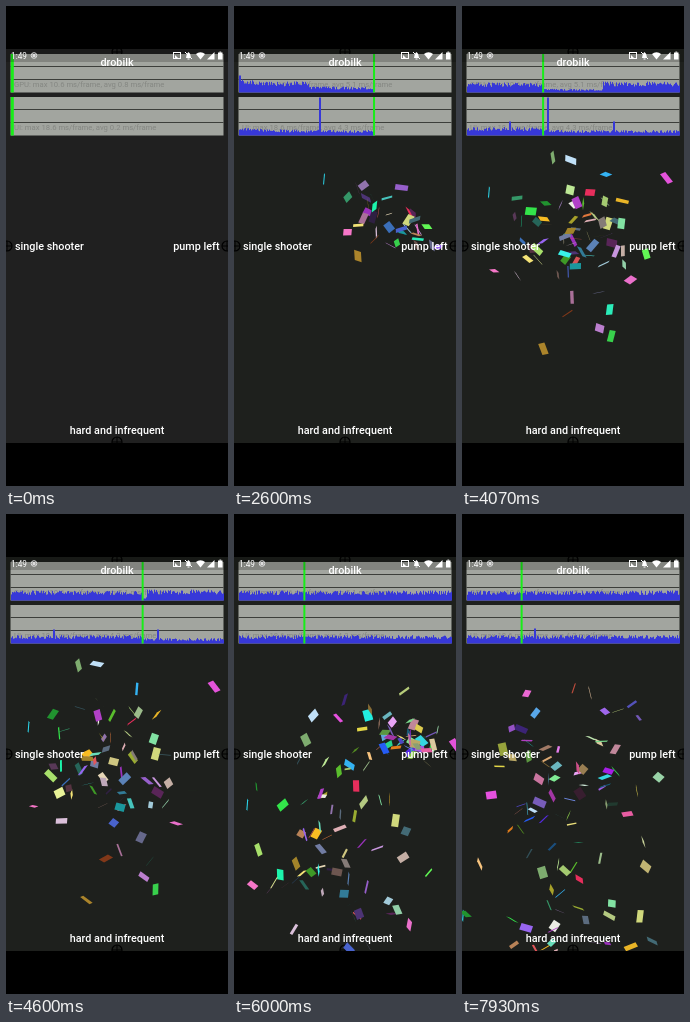
Animation of 222 by 480 pixels, one loop 8 s. Source, as an HTML page with a canvas:

```html
<!DOCTYPE html>
<html lang="en">
<head>
<meta charset="utf-8">
<title>Confetti</title>
<style>
html, body { margin: 0; width: 100%; height: 100%; overflow: hidden; background: #000; }
canvas { display: block; }
</style>
</head>
<body>
<canvas id="stage" width="222" height="480"></canvas>
<script>
const ctx = document.getElementById('stage').getContext('2d');
const LOOP = 8000, START = 1320, SPEED = 0.1048, LEFT = 5, SPAN = 213;
const TAU = Math.PI * 2;

const hash = n => {
  const v = Math.sin(n * 12.9898 + 4.1) * 43758.5453;
  return v - Math.floor(v);
};

// Each burst: launch time in ms, number of pieces
const bursts = [[2050, 13], [2240, 21], [2500, 7], [3200, 9], [3350, 25],
                [5560, 13], [5740, 36], [6350, 7], [6750, 6]];
const pieces = [];
for (const [born, count] of bursts) {
  for (let i = 0; i < count; i++) {
    const seed = pieces.length * 17 + 3;
    const r = k => hash(seed + k);
    pieces.push({
      born: born + 200 * r(0),
      reach: 5 + 100 * (r(1) + r(2)),
      lift: -20 + 88 * (r(3) + r(4)),
      fall: 48 + 46 * r(5),
      drift: 20 * (r(6) - 0.5),
      w: 9.5 + 3.5 * r(7),
      h: 6 + 2.5 * r(8),
      angle: TAU * r(9),
      tilt: TAU * r(10),
      flip: TAU * r(11),
      spin: 5 * (r(12) - 0.5),
      color: `rgb(${[13, 14, 15].map(k => Math.round(25 + 225 * r(k)))})`
    });
  }
}

function rect(x, y, w, h, color) {
  ctx.fillStyle = color;
  ctx.fillRect(x, y, w, h);
}

function label(text, x, y, size = 10.8, align = 'left', weight = 500, color = '#fff') {
  ctx.font = `${weight} ${size}px Roboto, sans-serif`;
  ctx.textAlign = align;
  ctx.fillStyle = color;
  ctx.fillText(text, x, y);
}

function shape(points, color = '#fff') {
  ctx.fillStyle = color;
  ctx.beginPath();
  points.forEach(([x, y]) => ctx.lineTo(x, y));
  ctx.fill();
}

function ring(x, y, r, color, width = 1) {
  ctx.strokeStyle = color;
  ctx.lineWidth = width;
  ctx.beginPath();
  ctx.arc(x, y, r, 0, TAU);
  ctx.stroke();
}

function emitter(x, y) {
  ring(x, y, 5, '#000', 1.2);
  rect(x - 5, y - 0.5, 10, 1, '#000');
  rect(x - 0.5, y - 5, 1, 10, '#000');
}

function gpuBar(x, sweep, t) {
  const noise = hash(x * 1.7 + sweep * 311);
  if (sweep > 0) return 5.5 + 4.5 * noise;
  if (x > 135) return 6 + 5 * noise;
  const height = x < 2 ? 17 : x < 70 ? 6 + 5 * noise + 4 * Math.exp(-x / 12) : 3 + 3 * noise;
  return height * (t > 3100 ? 0.6 : 1);
}

const spikes = { '0:80': 38, '0:146': 14, '1:42': 14, '2:67': 15 };
function uiBar(x, sweep) {
  const spike = spikes[sweep + ':' + x] || spikes[sweep + ':' + (x - 1)];
  if (spike) return spike;
  const noise = hash(x * 2.3 + sweep * 173 + 50);
  return sweep ? 4.5 + 4 * noise : 2.5 + 3 * noise + 3 * Math.exp(-x / 30);
}

function graph(top, height, caption, bar, t) {
  rect(4.5, top, 213, height, '#a2a59f');
  for (const part of [1, 2]) rect(4.5, Math.round(top + height * part / 3) - 1, 213, 1, '#3c3e3a');
  label(caption, 8, top + height - 6, 7.7, 'left', 400, 'rgba(30,32,30,0.22)');

  const run = Math.max(0, t - START) * SPEED;
  const sweep = Math.floor(run / SPAN), head = run % SPAN;
  for (let x = 0; x < SPAN; x++) {
    const n = x < head ? sweep : sweep - 1;
    if (n < 0) break;
    const h = bar(x, n, t);
    rect(LEFT + x, top + height - h, 1, h, '#3738d8');
  }
  const width = t > START ? 2 : 3;
  rect(LEFT + head - 0.2, top, width, height, '#18ee18');
}

function confetti(t) {
  for (const p of pieces) {
    const age = (t - p.born) / 1000;
    if (age < 0) continue;
    const x = 208 - p.reach * (1 - Math.exp(-2.5 * age)) + p.drift * age;
    const y = 242 - p.lift * (1 - Math.exp(-2 * age))
            + p.fall * (age - (1 - Math.exp(-1.2 * age)) / 1.2);
    if (y > 445) continue;
    const tilt = p.tilt + p.spin * age, flip = p.flip + p.spin * 1.4 * age;
    ctx.save();
    ctx.translate(x, y);
    ctx.rotate(p.angle + p.spin * 0.6 * age);
    ctx.transform(Math.cos(tilt), Math.sin(tilt) * Math.sin(flip), 0, Math.cos(flip), 0, 0);
    rect(-p.w / 2, -p.h / 2, p.w, p.h, p.color);
    ctx.restore();
  }
}

function statusBar() {
  rect(0, 43, 222, 13, 'rgba(0,0,0,0.2)');
  label('1:49', 5, 53, 8.3, 'left', 400);
  ring(28, 49.5, 2.8, '#ddd');
  rect(26.5, 48, 3, 3, '#ddd');
  // Cast
  ctx.strokeStyle = '#fff';
  ctx.lineWidth = 1;
  ctx.strokeRect(167.5, 46.5, 7, 6);
  shape([[169, 52], [169, 49], [172, 52]]);
  // Muted bell
  shape([[180, 52], [180.8, 48], [182.5, 46], [184.2, 48], [185, 52]]);
  rect(181.5, 52.5, 2, 1, '#fff');
  ctx.beginPath();
  ctx.moveTo(179, 46);
  ctx.lineTo(186, 53);
  ctx.stroke();
  // Wi-Fi, signal, battery
  shape([[190, 48], [192, 46.7], [194.5, 46.3], [197, 46.7], [199, 48], [194.5, 53.5]]);
  shape([[201, 53.5], [208.5, 46], [208.5, 53.5]]);
  rect(212, 46.5, 4.5, 7, '#fff');
  rect(213.4, 45.6, 1.8, 1, '#fff');
}

function draw(t) {
  const running = t > START;
  rect(0, 0, 222, 480, '#000');
  ctx.save();
  ctx.beginPath();
  ctx.rect(0, 43, 222, 394);
  ctx.clip();
  rect(0, 43, 222, 394, running ? '#1e201d' : '#202020');
  emitter(1, 240);
  emitter(221, 240);
  emitter(111, 46);
  emitter(111, 436);
  confetti(t);
  graph(48, 38.5, `GPU: max 10.6 ms/frame, avg ${running ? '5.1' : '0.8'} ms/frame`, gpuBar, t);
  graph(91, 38.5, `UI: max 18.6 ms/frame, avg ${running ? '4.3' : '0.2'} ms/frame`, uiBar, t);
  statusBar();
  label('drobilk', 111, 60, 10.8, 'center');
  label('single shooter', 9, 244);
  label('pump left', 213.5, 244, 10.8, 'right');
  label('hard and infrequent', 111, 428, 10.8, 'center');
  ctx.restore();
}

function tick() {
  draw(performance.now() % LOOP);
  requestAnimationFrame(tick);
}
tick();
</script>
</body>
</html>
```
